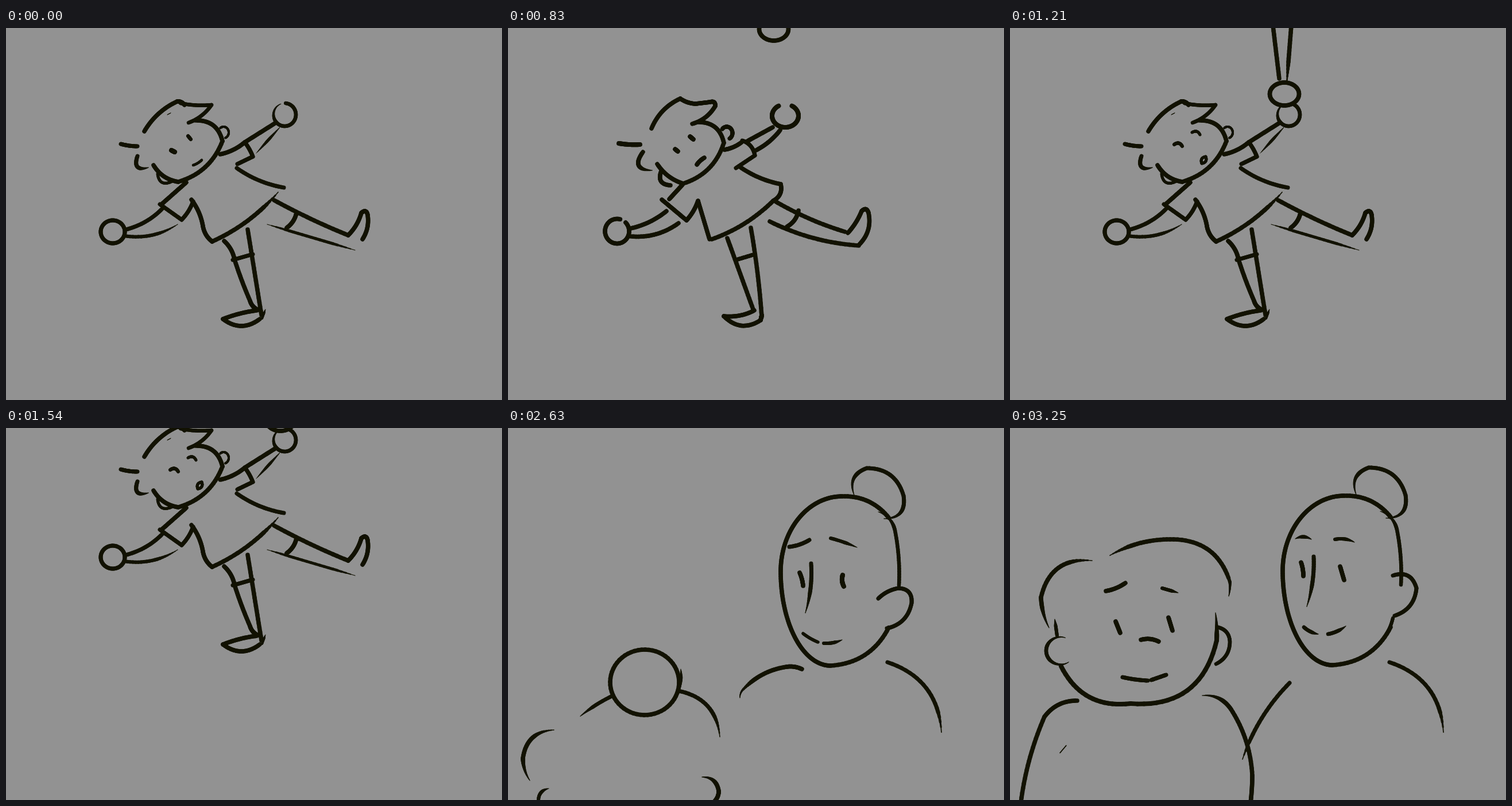
An HTML page with a canvas that plays this animation: 864 px wide and 648 px high, repeating every 4210 ms.

```html
<!DOCTYPE html>
<html lang="en">
<head>
<meta charset="utf-8">
<style>
html, body { margin: 0; height: 100%; overflow: hidden; background: #929292; }
canvas { display: block; }
</style>
</head>
<body>
<canvas id="stage" width="864" height="648"></canvas>
<script>
const ctx = document.getElementById('stage').getContext('2d');
const PAPER = '#929292', INK = '#121202', LOOP = 4210, TAPER = 45;
ctx.lineCap = ctx.lineJoin = 'round';

// Inks a polyline; "<" thins the start of the stroke, ">" thins its end.
function brush(pts, width, thin) {
  let walked = 0;
  const steps = pts.slice(1).map(([x, y], i) => Math.hypot(x - pts[i][0], y - pts[i][1]));
  const length = steps.reduce((a, b) => a + b, 0), fade = Math.min(TAPER, length / 2);
  steps.forEach((step, i) => {
    const middle = walked + step / 2;
    let press = 1;
    if (thin.includes('<')) press = Math.min(press, .15 + middle / fade);
    if (thin.includes('>')) press = Math.min(press, .15 + (length - middle) / fade);
    ctx.lineWidth = width * press;
    ctx.beginPath();
    ctx.moveTo(...pts[i]);
    ctx.lineTo(...pts[i + 1]);
    ctx.stroke();
    walked += step;
  });
}

// Chain of bows: x, y, bulge, x, y, bulge ... x, y. A bulge is the height of
// the bow in pixels, positive to the right of the direction of travel.
function draw(chain, width = 7.5, thin = '') {
  const pts = [chain.slice(0, 2)];
  for (let i = 0; i + 4 < chain.length; i += 3) {
    const [x0, y0, bulge, x1, y1] = chain.slice(i, i + 5);
    const lift = 4 * bulge / Math.hypot(x1 - x0, y1 - y0);
    for (let n = 1; n <= 20; n++) {
      const t = n / 20, h = lift * t * (1 - t);
      pts.push([x0 + (x1 - x0) * t - (y1 - y0) * h, y0 + (y1 - y0) * t + (x1 - x0) * h]);
    }
  }
  brush(pts, width, thin);
}

// Elliptic arc, angles in degrees.
function ring(cx, cy, rx, ry, from = 0, sweep = 360, width = 7.5, thin = '') {
  const pts = Array.from({ length: 61 }, (_, n) => {
    const a = (from + sweep * n / 60) * Math.PI / 180;
    return [cx + rx * Math.cos(a), cy + ry * Math.sin(a)];
  });
  brush(pts, width, thin);
}

function shifted(dx, dy, ...parts) {
  ctx.save();
  ctx.translate(dx, dy);
  parts.forEach(part => part());
  ctx.restore();
}

// Balancing child, two alternating drawings.
function loosePose() {
  // head
  draw([241, 180, -6, 298, 128, -2, 311, 134]);
  draw([304, 131, 2, 358, 134, -4, 318, 165], 6.5);
  draw([330, 161, -12, 377, 197, -13, 300, 268, -6, 257, 239]);
  ring(379, 182, 9, 10, -130, 200, 4);
  draw([264, 254, 9, 288, 268], 5);
  draw([200, 202, 1, 229, 206], 7);
  draw([229, 223, 13, 248, 243], 7, '>');
  draw([281, 151, 0, 287, 148], 1);
  // shirt
  draw([314, 269, 0, 271, 307]);
  draw([268, 307, 0, 306, 334, 2, 326, 302], 7);
  draw([402, 244, 5, 484, 278], 7);
  draw([474, 286, -8, 359, 372, -3, 343, 345, 3, 323, 299], 7.5, '<');
  draw([416, 199, -1, 430, 224, 0, 403, 237], 7);
  // arms
  draw([373, 220, 3, 416, 199, 0, 470, 165]);
  draw([478, 172, 0, 436, 218], 5, '<>');
  ring(485.5, 151, 19.5, 20, -85, 335, 6.5, '>');
  draw([272, 315, -5, 209, 351], 7);
  draw([299, 342, -9, 206, 362], 6, '<');
  ring(186, 355, 21, 20, -60, 355, 7);
  // legs
  draw([467, 300, 2, 596, 361, 3, 619, 322, -5, 630, 326, -4, 621, 368]);
  draw([455, 342, 0, 608, 387], 5, '<>');
  draw([506, 322, -3, 489, 348]);
  draw([380, 371, -3, 398, 403, 1, 425, 475, 2, 437, 490]);
  draw([421, 351, 0, 445, 500]);
  draw([395, 404, 0, 430, 394], 7);
  draw([437, 492, 2, 378, 507, 12, 442, 507]);
  draw([452, 490, 0, 446, 506], 4, '<');
}
function firmPose() {
  // head
  draw([250, 175, -7, 300, 123, 2, 327, 132]);
  draw([327, 132, 0, 352, 129, -4, 361, 136, -5, 321, 167]);
  draw([330, 164, -12, 376, 200, -13, 305, 271, -5, 260, 237]);
  ring(381, 183, 10, 11, -140, 200, 7);
  draw([267, 249, 10, 283, 274]);
  draw([193, 201, 1, 230, 203], 8);
  draw([235, 216, 17, 251, 248], 7.5, '>');
  // shirt
  draw([304, 273, 0, 281, 298]);
  draw([268, 299, 0, 311, 335, 2, 331, 301, 0, 351, 368]);
  draw([404, 242, 4, 475, 272, -6, 462, 301, -7, 355, 368]);
  draw([408, 196, -5, 430, 222, 0, 397, 244], 7);
  // arms
  draw([377, 212, 2, 407, 199]);
  draw([417, 197, 0, 461, 173]);
  draw([474, 178, -3, 432, 213]);
  ring(483, 153, 23, 20, -120, -300, 8);
  draw([276, 319, -4, 214, 349]);
  draw([297, 340, -8, 214, 363]);
  ring(190, 354, 21, 21.5, -75, -330);
  // legs
  draw([464, 301, 4, 587, 355]);
  draw([456, 337, 8, 611, 379]);
  draw([592, 357, 2, 616, 319, -5, 628, 322, -8, 611, 378]);
  draw([506, 318, -4, 486, 346]);
  draw([382, 366, 0, 427, 490]);
  draw([423, 348, -2, 442, 503]);
  draw([397, 404, 0, 427, 395], 7);
  draw([429, 492, -4, 376, 502, 13, 440, 509, 0, 442, 500]);
}

function calm() {
  draw([288, 213, 0, 294, 216], 8);
  draw([317, 188, 0, 322, 194], 6);
  draw([326, 239, 1, 341, 230], 4.5);
}
function openMouth() {
  draw([329, 238, -1, 342, 226]);
}
function squint() {
  draw([288, 218, 0, 293, 212]);
  draw([317, 192, 0, 325, 188], 6.5);
  openMouth();
}
function glance() {
  draw([291, 211, 0, 296, 215]);
  draw([317, 189, 0, 323, 194]);
  openMouth();
}
function startled() {
  draw([286, 203, -4, 300, 206], 6);
  draw([317, 182, -4, 331, 186], 5);
  draw([334, 236, -4, 341, 224, -4, 334, 236], 5);
}

function reachingArm() {
  draw([455, -30, 0, 469, 88]);
  draw([492, -30, 0, 482, 97], 7.5, '>');
  ctx.beginPath();
  ctx.ellipse(478, 115, 25.5, 20, 0, 0, 7);
  ctx.fill();
  ring(478, 115, 25.5, 20);
}
function lift(dy) {
  shifted(0, dy, loosePose, startled, reachingArm);
}

// Adult and child side by side.
function adultHead() {
  draw([663, 156, 11, 582, 119]);
  ring(582, 250, 107, 131, -90, -90);
  ring(562, 250, 87, 164, 180, -90);
  draw([562, 414, 17, 663, 348]);
  draw([645, 146, -6, 674, 178, -3, 681, 274], 6.5, '<');
  draw([603, 117, -13, 625, 70, -15, 689, 118, -15, 655, 158], 7, '<>');
}
function farShoulder() {
  draw([661, 408, -26, 755, 530], 7, '>');
}
function lookDown() {
  draw([490, 207, 2, 525, 195], 7);
  draw([562, 192, -1, 608, 208], 6, '>');
  draw([508, 252, -1, 514, 275]);
  draw([583, 256, 2, 585, 276], 8);
  draw([528, 236, -4, 518, 322], 7, '>');
  draw([514, 358, 1, 540, 373], 5.5);
  draw([550, 375, 2, 582, 369], 6, '>');
  draw([645, 297, -3, 680, 279, -9, 703, 305, -10, 660, 349], 7);
  draw([404, 470, -2, 411, 454, -7, 485, 416, -2, 512, 420], 7.5, '<');
}
function lookAhead() {
  draw([497, 194, -4, 525, 195], 6, '<>');
  draw([566, 195, -3, 600, 200], 6, '>');
  draw([507, 235, -1, 511, 259]);
  draw([575, 242, 0, 582, 266]);
  draw([529, 225, -4, 517, 312], 7, '>');
  draw([512, 348, 2, 537, 360], 6.5, '>');
  draw([554, 360, 2, 585, 346], 6.5, '>');
  draw([667, 258, -12, 708, 280, -10, 670, 328], 7);
  draw([657, 358, 1, 667, 332], 6);
  draw([405, 578, -9, 487, 445], 7, '<');
}

function risenChild() {
  // hair and head
  draw([68, 348, -3, 54, 295, -24, 143, 231], 7.5, '<>');
  draw([174, 222, -8, 285, 194, -22, 383, 268, -1, 381, 293], 7.5, '<>');
  draw([78, 333, 0, 82, 362], 6, '<');
  ring(88, 388, 25, 24, -70, -235, 6.5, '<>');
  draw([89, 415, 24, 210, 480, 40, 360, 370, 1, 358, 322], 8, '>');
  draw([362, 347, -6, 383, 372, -7, 359, 411], 6.5);
  // face
  draw([167, 284, 2, 201, 270]);
  draw([265, 279, 0, 293, 287], 6, '>');
  draw([184, 337, 0, 192, 357]);
  draw([276, 330, 0, 283, 353]);
  draw([228, 369, -3, 259, 372]);
  draw([196, 434, 1, 240, 440], 7);
  draw([246, 439, 0, 272, 430], 7);
  // shoulders
  draw([117, 475, 8, 60, 503, 6, 18, 660]);
  draw([335, 466, -8, 385, 490, -8, 422, 605, -1, 418, 660], 7.5, '<');
  draw([87, 566, 0, 98, 553], 1.5);
}
function lowChild() {
  ring(238, 443, 60, 57, -95);
  draw([301, 420, -2, 297, 455], 6, '<');
  draw([126, 502, -2, 183, 466], 6.5, '<');
  draw([297, 458, -20, 369, 538], 7, '>');
  draw([80, 526, 15, 26, 575, 3, 38, 614], 7.5, '<>');
  draw([71, 628, 6, 53, 650], 6, '<');
  draw([338, 608, -8, 367, 632, -2, 360, 650], 7.5, '<');
}
function pair(child, childY, look, adultY) {
  shifted(0, adultY, adultHead, look);
  farShoulder();
  shifted(0, childY, child);
}

const wobble = [0, 170, 330, 500, 670].map((start, i) =>
  [start, () => shifted(0, 0, ...(i % 2 ? [firmPose, squint] : [loosePose, calm]))]);

const reach = [830, 920, 1000, 1130, 1210].map((start, i) => [start, () => {
  const away = (1 - i / 4) ** 2;
  shifted(0, 0, ...(i < 2 ? [firmPose, glance] : [loosePose, startled]));
  shifted(-15 * away, -113 * away, reachingArm);
}]);

const pull = [1460, 1540, 1630, 1710].map((start, i) =>
  [start, () => lift(-40 * (i + 1) ** 1.7)]);

const steps = [
  ...wobble, ...reach, ...pull,
  [1790, () => {}],
  [2630, () => pair(lowChild, 0, lookDown, 0)],
  [2750, () => pair(risenChild, 130, lookDown, 0)],
  [2880, () => pair(risenChild, 20, lookAhead, 0)],
  [3040, () => pair(risenChild, -12, lookAhead, -13)],
  [3250, () => pair(risenChild, 0, lookAhead, -1)]
];

let shown;
function tick() {
  const time = performance.now() % LOOP;
  const step = steps.findLast(([start]) => start <= time);
  if (step !== shown) {
    ctx.fillStyle = PAPER;
    ctx.strokeStyle = INK;
    ctx.fillRect(0, 0, 864, 648);
    step[1]();
    shown = step;
  }
  requestAnimationFrame(tick);
}
tick();
</script>
</body>
</html>
```
